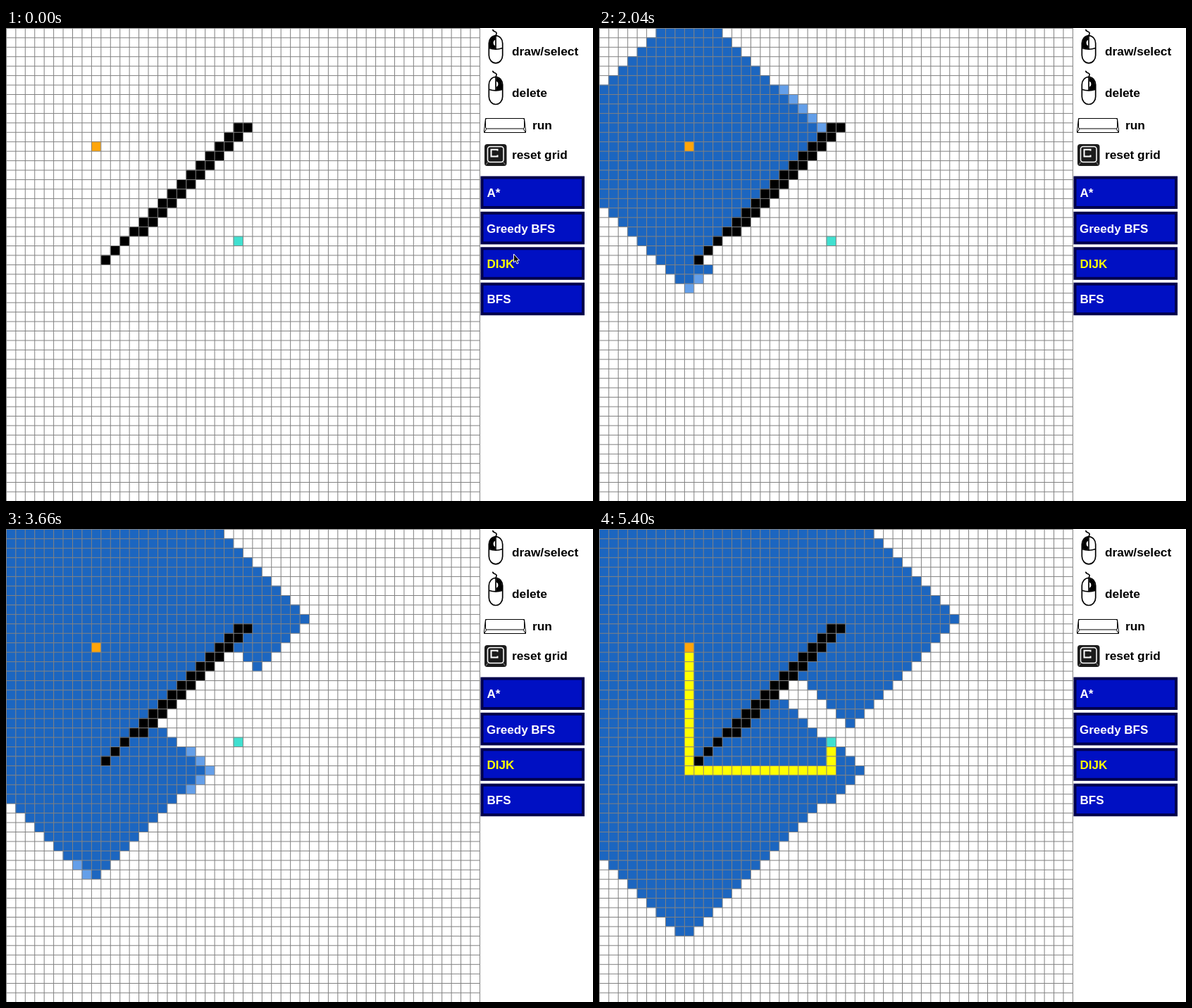
An HTML page with a canvas for the animation above (5460 ms loop, 833x672 px).

```html
<!DOCTYPE html>
<html lang="en">
<head>
<meta charset="utf-8">
<title>Pathfinding grid</title>
<style>
  html, body { margin: 0; width: 100%; height: 100%; overflow: hidden; background: #fff; }
  canvas, svg { position: absolute; left: 0; top: 0; width: 833px; height: 672px; display: block; }
  text { font-family: "Liberation Sans", Arial, sans-serif; font-weight: bold; }
  .label { font-size: 17.3px; fill: #000; }
  .button text { font-size: 17px; fill: #fff; }
  .button rect { fill: #0010c3; stroke: #00004c; stroke-width: 4; }
  .button.on text { fill: #ff0; }
  .line { fill: none; stroke: #000; stroke-width: 1.7; }
</style>
</head>
<body>
<canvas id="grid" width="833" height="672"></canvas>
<svg viewBox="0 0 833 672">
  <defs>
    <g id="mouse">
      <path class="line" d="M691 2 C690 6 697 4 696 8 L695 11"/>
      <rect class="line" x="685.3" y="10.8" width="19.4" height="39" rx="9.6" ry="11"/>
      <path class="line" d="M685.3 28.5 Q695 32 704.7 28.5 M695 11 V30"/>
    </g>
    <path id="press" d="M694 11.5 Q686 13 686 22 V28 Q690 29.5 694 29.8 V25 Q691.5 24 691.5 21 Q691.5 18 694 17 Z"/>
  </defs>

  <use href="#mouse"/>
  <use href="#press"/>
  <text class="label" x="718" y="39">draw/select</text>

  <g transform="translate(0 58.7)">
    <use href="#mouse"/>
    <use href="#press" transform="matrix(-1 0 0 1 1390 0)"/>
  </g>
  <text class="label" x="718" y="97.5">delete</text>

  <g fill="none" stroke="#000" stroke-width="1">
    <path d="M680.5 128.5 H735.5 L737.5 146 V148.5 H678.5 V146 Z"/>
    <rect x="680.5" y="128.5" width="55" height="14.5" rx="2"/>
    <path d="M682 143 L679 148 M734 143 L737 148"/>
  </g>
  <text class="label" x="747" y="144">run</text>

  <rect x="679" y="165" width="31.5" height="31" rx="4" fill="#1c1c1c"/>
  <rect x="683.5" y="168.5" width="22.5" height="22" rx="3.5" fill="#1c1c1c" stroke="#fff" stroke-width="1.5"/>
  <path d="M681 194 L684 190.5 M708.5 194 L705.5 190.5" stroke="#999"/>
  <path d="M697.5 174.5 V172.8 H688.5 V182.5 H697.5 V180.5" fill="none" stroke="#fff" stroke-width="2"/>
  <text class="label" x="718" y="186">reset grid</text>

  <g class="button"><rect x="675.5" y="212.5" width="143.5" height="42.5"/><text x="682.5" y="240">A*</text></g>
  <g class="button"><rect x="675.5" y="262.9" width="143.5" height="42.5"/><text x="682" y="290.5">Greedy BFS</text></g>
  <g class="button on"><rect x="675.5" y="313.3" width="143.5" height="42.5"/><text x="682.5" y="341">DIJK</text></g>
  <g class="button"><rect x="675.5" y="363.7" width="143.5" height="42.5"/><text x="682.5" y="391">BFS</text></g>

  <path id="cursor" d="M720.5 321 V333 L723.2 330.5 L725 335 L727 334.2 L725.2 330 H728.5 Z" fill="#000" stroke="#fff" stroke-width="1"/>
</svg>
<script>
const LOOP = 5460, STEP = 30, LAST = 180, SIZE = 50, CELL = 13.44, TRAIL = 7;
const WHITE = '#fff', GRAY = '#808080', DARK = '#1c66c0', LIGHT = '#649fe9';
const ctx = document.getElementById('grid').getContext('2d');
const cursor = document.getElementById('cursor');

const id = (x, y) => y * SIZE + x;
const start = id(9, 12), goal = id(24, 22);

const walls = new Set();
for (let y = 10; y <= 24; y++) {
  walls.add(id(34 - y, y));
  if (y <= 21) walls.add(id(35 - y, y));
}

// Uniform-cost search; equal costs leave the queue in insertion order.
function search() {
  const from = new Map([[start, -1]]), queue = [start], order = [];
  for (const cell of queue) {
    if (cell !== start) order.push(cell);
    if (cell === goal) break;
    const x = cell % SIZE, y = Math.floor(cell / SIZE);
    for (const [dx, dy] of [[1, 0], [-1, 0], [0, 1], [0, -1]]) {
      const nx = x + dx, ny = y + dy, next = id(nx, ny);
      if (nx < 0 || ny < 0 || nx >= SIZE || ny >= SIZE) continue;
      if (walls.has(next) || from.has(next)) continue;
      from.set(next, cell);
      queue.push(next);
    }
  }
  const path = [];
  for (let c = from.get(goal); c !== start; c = from.get(c)) path.push(c);
  return { order, path };
}
const { order, path } = search();

// Search progress: [step, cells handled]
const pace = [[1, 0], [22, 125], [46, 268], [90, 532], [122, 726], [140, 834],
              [LAST, order.length + path.length]];

function ticksAt(step) {
  if (step <= pace[0][0]) return 0;
  const i = pace.findIndex(p => step <= p[0]);
  const [s0, c0] = pace[i - 1], [s1, c1] = pace[i];
  return Math.round(c0 + (c1 - c0) * (step - s0) / (s1 - s0));
}

function fill(cell, color) {
  ctx.fillStyle = color;
  ctx.fillRect(cell % SIZE * CELL, Math.floor(cell / SIZE) * CELL, CELL + .3, CELL + .3);
}

function draw(step) {
  const ticks = ticksAt(step);
  ctx.fillStyle = WHITE;
  ctx.fillRect(0, 0, 833, 672);
  order.slice(0, ticks).forEach((c, i) => fill(c, i < ticks - TRAIL ? DARK : LIGHT));
  path.slice(0, Math.max(0, ticks - order.length)).forEach(c => fill(c, '#ff0'));
  walls.forEach(c => fill(c, '#000'));
  fill(start, '#ffa50a');
  fill(goal, '#40e0d0');
  ctx.fillStyle = GRAY;
  for (let i = 0; i <= SIZE; i++) {
    const p = Math.max(0, i * CELL - .08);
    ctx.fillRect(p, 0, 1, 672);
    ctx.fillRect(0, p, 672, 1);
  }
  cursor.style.display = step < 1 ? '' : 'none';
}

let shown = -1;
function tick() {
  const step = Math.min(LAST, Math.floor(performance.now() % LOOP / STEP));
  if (step !== shown) draw(shown = step);
  requestAnimationFrame(tick);
}
tick();
</script>
</body>
</html>
```
